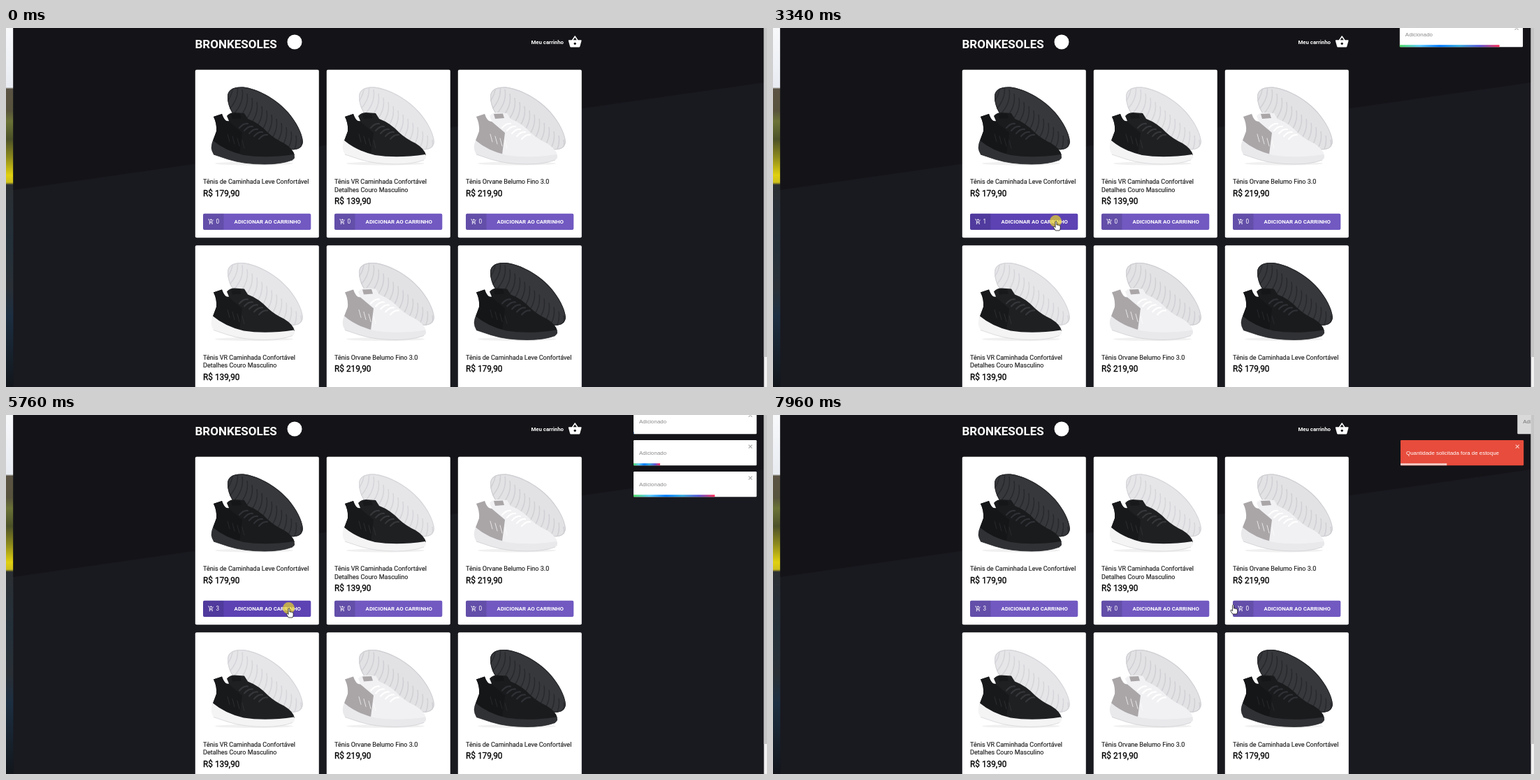
These frames come from a looping animation (1089 px wide and 514 px high, 8 s). An HTML page:

```html
<!DOCTYPE html>
<html lang="pt-BR">
<head>
<meta charset="utf-8">
<title>Loja de tênis</title>
<style>
  html, body { margin: 0; width: 100%; height: 100%; overflow: hidden; background: #191920; }
  svg { display: block; }
  text { font-family: Roboto, sans-serif; white-space: pre; }
  .b { font-weight: 700; fill: #fff; }
  .name { font-size: 9.03px; fill: #1c1c1c; stroke: #1c1c1c; stroke-width: .15; }
  .price { font-size: 11.85px; stroke: #000; stroke-width: .3; }
  .toast text { font: 7.9px "Liberation Sans", Arial, sans-serif; }
</style>
</head>
<body>
<svg id="stage" width="1089" height="514" viewBox="0 0 1089 514">
  <defs>
    <linearGradient id="wall" x2="0" y2="1">
      <stop offset="0" stop-color="#f8f9fb"/><stop offset=".165" stop-color="#e8ecf2"/>
      <stop offset=".17" stop-color="#5b5344"/><stop offset=".23" stop-color="#57533c"/>
      <stop offset=".26" stop-color="#6b7236"/><stop offset=".31" stop-color="#4c5128"/>
      <stop offset=".36" stop-color="#8d8a1c"/><stop offset=".41" stop-color="#e0d010"/>
      <stop offset=".43" stop-color="#cfc01c"/><stop offset=".437" stop-color="#2b2f33"/>
      <stop offset=".6" stop-color="#23303a"/><stop offset=".72" stop-color="#2a2f35"/>
      <stop offset=".8" stop-color="#1c2f42"/><stop offset="1" stop-color="#12161b"/>
    </linearGradient>
    <linearGradient id="rainbow">
      <stop offset="0" stop-color="#4cd964"/><stop offset=".2" stop-color="#5ac8fa"/>
      <stop offset=".4" stop-color="#007aff"/><stop offset=".6" stop-color="#34aadc"/>
      <stop offset=".8" stop-color="#5856d6"/><stop offset="1" stop-color="#ff2d55"/>
    </linearGradient>
    <path id="sole" d="M317 98C317 87 329 83 343 85C365 89 388 103 404 121C415 134 424 150 425 163C424 172 417 175 408 174L372 160L330 128C322 122 317 110 317 98Z"/>
    <clipPath id="soleClip"><use href="#sole"/></clipPath>
    <path id="upper" d="M297 127L309 123Q313 135 319 133L316 126Q320 121 327 121L341 122L346 130Q362 136 375 150Q385 159 398 165Q411 173 413 182Q400 190 380 190L330 186Q302 178 295 165L301 148Q302 137 297 127Z"/>
    <path id="midsole" d="M296 161Q314 176 340 182Q372 187 412 181Q415 186 410 189Q394 195 370 195Q340 195 318 188L297 181Q291 172 296 161Z"/>
    <path id="quarter" d="M297 127L309 123Q313 135 319 134L338 150L334 181Q312 177 296 161L301 148Q302 137 297 127Z"/>
    <path id="cart" d="M11 9h2V6h3V4h-3V1h-2v3H8v2h3v3zm-4 9c-1.1 0-2 .9-2 2s.9 2 2 2 2-.9 2-2-.9-2-2-2zm10 0c-1.1 0-2 .9-2 2s.9 2 2 2 2-.9 2-2-.9-2-2-2zm-9.83-3.25l.93-1.75h7.45c.75 0 1.41-.41 1.75-1.03l3.86-7.01L19.42 4l-3.87 7H8.53L4.27 2H1v2h2l3.6 7.59-1.35 2.45C4.5 15.4 5.5 17 7 17h12v-2H7.42z"/>
  </defs>
  <g id="page"></g>
  <g id="toasts"></g>
  <rect x="1084.6" width="4.4" height="514" fill="#f1f1f1"/>
  <rect x="1084.6" width="4.4" height="471" fill="#c6c6c6"/>
  <circle id="click" cx="404.5" cy="276.5" r="8.5" fill="#f5e11e" opacity=".65"/>
  <g id="cursor" fill="#fff" stroke="#111" stroke-width=".8" stroke-linejoin="round">
    <path id="arrow" d="M0 0V9.8L2.3 7.7 3.8 11.3 5.3 10.6 3.9 7.2H6.9Z"/>
    <path id="hand" d="M-1 1Q0-.6 1 1V5.5Q2 4.8 2.8 5.8Q4 5.2 4.6 6.2Q6 5.8 6.2 7.4V10Q6 12 5 13.5H-.8L-3.6 9Q-4 7.5-2.4 7.6L-1 9Z"/>
  </g>
</svg>
<script>
const $ = id => document.getElementById(id);
const clamp = v => Math.min(1, Math.max(0, v));
const range = (n, f) => Array.from({ length: n }, (_, i) => f(i)).join('');

// ---- Static page ----
const products = [
  { lines: ['Tênis de Caminhada Leve Confortável'], price: '179,90',
    sole: '#37383b', tread: '#28292c', upper: '#1a1b1d', mid: '#303134', quarter: '#151618', lace: '#303136' },
  { lines: ['Tênis VR Caminhada Confortável', 'Detalhes Couro Masculino'], price: '139,90',
    sole: '#e6e6e9', tread: '#d6d6da', upper: '#1f2022', mid: '#f4f4f5', quarter: '#18191b', lace: '#36373a' },
  { lines: ['Tênis Orvane Belumo Fino 3.0'], price: '219,90',
    sole: '#e2e2e5', tread: '#d0d0d4', upper: '#f1f1f3', mid: '#e9e9ec', quarter: '#aaa6a8', lace: '#fff' }
];

const shoe = p => `
  <ellipse cx="355" cy="194" rx="56" ry="2.5" fill="#f0f0f0"/>
  <use href="#sole" fill="${p.sole}"/>
  <g clip-path="url(#soleClip)" fill="none" stroke="${p.tread}" stroke-width="1.5">
    ${range(17, i => `<path d="M${324 + 7 * i} ${76 + 6 * i}q4 24-22 44"/>`)}
    <use href="#sole" stroke-width="2.5"/>
  </g>
  <use href="#upper" fill="${p.upper}"/>
  <use href="#quarter" fill="${p.quarter}"/>
  <path d="M322 123L335 122.5L337 129L324 130Z" fill="${p.quarter}"/>
  <g stroke="${p.lace}" stroke-width="2" fill="none" stroke-linecap="round">
    ${range(5, i => `<path d="M${334 + 7 * i} ${143 + 4 * i}q6-7 12-6"/>`)}
    ${range(4, i => `<path d="M${317 + 7 * i} ${152 + 3 * i}l3 11" stroke-width="1" opacity=".7"/>`)}
  </g>
  <use href="#midsole" fill="${p.mid}"/>
  <path d="M297 181L318 188Q340 195 370 195Q394 195 410 189" fill="none" stroke="${p.tread}" stroke-width=".8"/>`;

const card = (p, i) => {
  const shift = 11.3 * (p.lines.length - 1);
  return `<g transform="translate(${i % 3 * 188} ${i > 2 ? 251.5 : 0})">
    <rect x="270.8" y="59.8" width="177" height="240.4" rx="2" fill="#fff"/>
    ${shoe(p)}
    ${p.lines.map((s, n) => `<text class="name" x="282" y="${223.2 + 11.3 * n}">${s}</text>`).join('')}
    <text class="price" x="282" y="${240.7 + shift}">R$ ${p.price}</text>
    <rect id="btn${i}" x="282" y="265.8" width="154.3" height="23.2" rx="2" fill="#7159c1"/>
    <path d="M284 265.8h27.5v23.2h-27.5q-2 0-2-2v-19.2q0-2 2-2z" fill-opacity=".12"/>
    <use href="#cart" fill="#fff" transform="translate(288.8 272.8) scale(.375)"/>
    <text id="count${i}" x="300.5" y="280.2" font-size="8.2" fill="#fff">0</text>
    <text class="b" x="326.6" y="280.2" font-size="7.86">ADICIONAR AO CARRINHO</text>
  </g>`;
};

$('page').innerHTML = `
  <rect width="11" height="514" fill="url(#wall)"/>
  <rect x="10.4" width="1074.6" height="514" fill="#191920"/>
  <path d="M10.4 0H1085V78L10.4 232Z" fill="#141418"/>
  <text class="b" x="270.5" y="29" font-size="17">BRONKESOLES</text>
  <circle cx="413" cy="20" r="10.5" fill="#fff"/>
  <text class="b" x="751.5" y="23.3" font-size="7.8">Meu carrinho</text>
  <path transform="translate(804 9.6) scale(.85)" fill="#fff" d="M17.21 9l-4.38-6.56c-.4-.57-1.26-.57-1.66 0L6.79 9H2c-.6 0-1.1.6-1 1.27l2.58 9.27c.23.84 1 1.46 1.92 1.46h13c.92 0 1.69-.62 1.93-1.46L23 10.27C23.1 9.6 22.6 9 22 9zM9 9l3-4.4L15 9zm3 8c-1.1 0-2-.9-2-2s.9-2 2-2 2 .9 2 2-.9 2-2 2z"/>
  ${[0, 1, 2, 1, 2, 0].map((n, i) => card(products[n], i)).join('')}`;

// ---- Motion helpers ----
const bezier = (x1, y1, x2, y2) => x => {
  const at = (a, b, s) => 3 * a * s * (1 - s) ** 2 + 3 * b * s * s * (1 - s) + s ** 3;
  let lo = 0, hi = 1;
  for (let i = 0; i < 24; i++) {
    const m = (lo + hi) / 2;
    if (at(x1, x2, m) < x) lo = m; else hi = m;
  }
  return at(y1, y2, hi);
};
const ease = bezier(.25, .1, .25, 1);
const bounce = bezier(.215, .61, .355, 1);
const linear = x => x;

// Value of column c in keys [[time, ...values], ...] at time t
function track(keys, t, curve = linear, c = 1) {
  const n = keys.findIndex(k => k[0] > t);
  if (n === 0) return keys[0][c];
  if (n < 0) return keys[keys.length - 1][c];
  const a = keys[n - 1], b = keys[n];
  return a[c] + (b[c] - a[c]) * curve((t - a[0]) / (b[0] - a[0]));
}

// ---- Toasts ----
const ZOOM = .55, LIFE = 3000, ANIM = 700, COLLAPSE = 300, DELAY = 285;
const enterX = [[0, 3000], [.6, -25], [.75, 10], [.9, -5], [1, 0]];
const exitX = [[0, 0], [.2, -20], [1, 2000]];
const exitAlpha = [[0, 1], [.2, 1], [1, 0]];
const added = { text: 'Adicionado', bg: '#fff', ink: '#8a8a8a', bar: 'url(#rainbow)', close: '#aaa' };
const failed = { text: 'Quantidade solicitada fora de estoque', bg: '#e74c3c', ink: '#fff', bar: 'rgba(255,255,255,.7)', close: '#f7c9c4' };
const toasts = [[2773, added], [3410, added], [4744, added], [6090, failed]].map(([start, s]) => {
  const el = document.createElementNS('http://www.w3.org/2000/svg', 'g');
  el.setAttribute('class', 'toast');
  el.innerHTML = `<rect width="176.2" height="36.2" rx="1.2" fill="${s.bg}"/>
    <text x="8" y="20.8" fill="${s.ink}">${s.text}</text>
    <path d="M164.7 6.6l5 5m0-5l-5 5" stroke="${s.close}" stroke-width="1.2"/>
    <rect class="bar" y="33.2" height="3" fill="${s.bar}"/>`;
  $('toasts').append(el);
  return { start, el, bar: el.querySelector('.bar') };
});

function drawToasts(t) {
  let slot = 0;
  for (const { start, el, bar } of toasts) {
    const age = t - start, out = (age - LIFE) / ANIM;
    const dx = out > 0 ? track(exitX, out, ease) : track(enterX, age / ANIM, bounce);
    el.style.display = age > DELAY && out < 1 ? '' : 'none';
    el.setAttribute('transform', `translate(${898 + dx * ZOOM} ${-9 + 45 * slot})`);
    el.setAttribute('opacity', track(exitAlpha, out, ease));
    bar.setAttribute('width', 176 * clamp(1 - age / LIFE));
    slot += 1 - ease(clamp((age - LIFE - ANIM) / COLLAPSE));
  }
}

// ---- Pointer and buttons ----
const pointer = [
  [450, 1080, 503], [620, 960, 425], [850, 760, 330], [1060, 580, 268], [1220, 480, 245],
  [1310, 452, 247], [1390, 431.7, 253.3], [1470, 417, 264], [1600, 408, 274], [1790, 405, 276.5],
  [6530, 405, 276.5], [7080, 407.5, 277], [7310, 408, 278], [7400, 412, 281], [7480, 437, 282],
  [7560, 470, 282], [7780, 625, 278], [7960, 658.5, 271.5]
];
const clicks = [[2250, 2400], [3250, 3400], [4210, 4360], [5690, 5850]];
const hovers = [[1440, 7480], [7560, 7780], [7960, 8200]];
const within = (t, [a, b]) => t >= a && t < b;

function drawPointer(t) {
  const over = hovers.some(h => within(t, h));
  $('cursor').style.display = t < 450 ? 'none' : '';
  $('cursor').setAttribute('transform', `translate(${track(pointer, t)} ${track(pointer, t, linear, 2)})`);
  $('hand').style.display = over ? '' : 'none';
  $('arrow').style.display = over ? 'none' : '';
  $('click').style.display = clicks.some(c => within(t, c)) ? '' : 'none';
  hovers.forEach(([a, b], i) => {
    const k = ease(clamp((t - a) / 200)) - ease(clamp((t - b) / 200));
    $('btn' + i).setAttribute('fill', `rgb(${113 - 21 * k},${89 - 23 * k},${193 - 14 * k})`);
  });
}

function frame(now) {
  const t = now % 8000;
  $('count0').textContent = toasts.slice(0, 3).filter(o => t >= o.start).length;
  drawToasts(t);
  drawPointer(t);
  requestAnimationFrame(frame);
}
requestAnimationFrame(frame);
</script>
</body>
</html>
```
